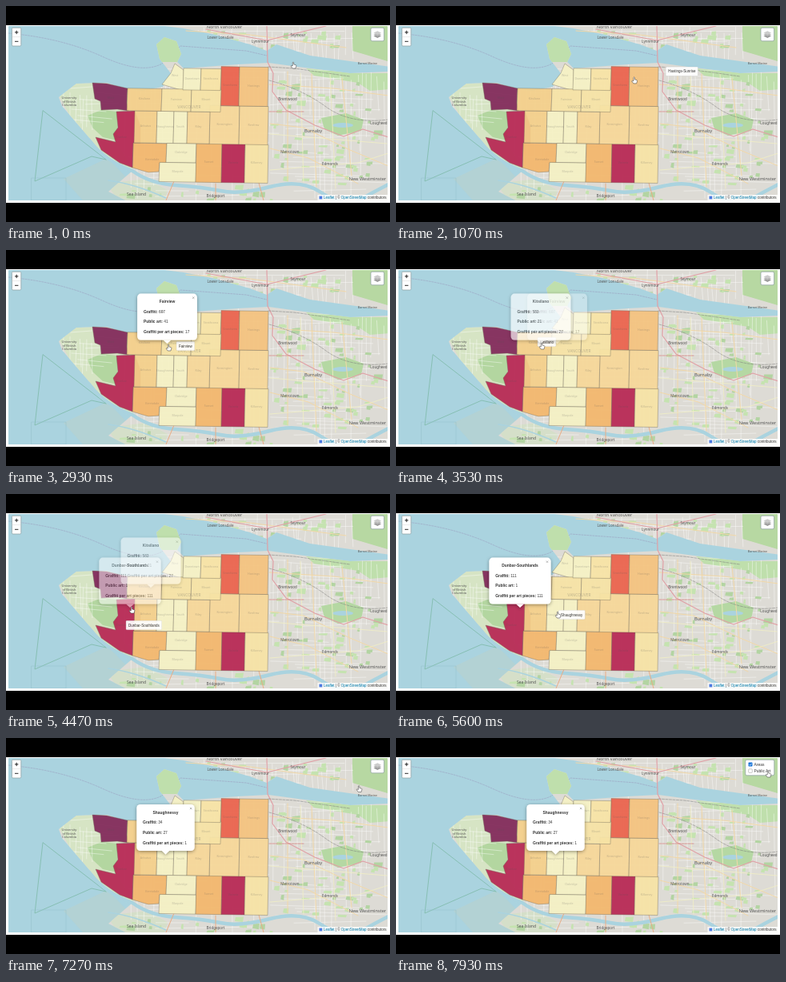
Recreate the animation shown at these times as an HTML page. Size 480 by 270 pixels, loop 8 s.

```html
<!DOCTYPE html>
<html lang="en">
<head>
<meta charset="utf-8">
<title>Neighbourhood map</title>
<style>
html, body { margin: 0; width: 100%; height: 100%; overflow: hidden; background: #000; }
svg { display: block; width: 100vw; height: 100vh; font-family: "Liberation Sans", Arial, sans-serif; }
.label { font-family: "Noto Sans", sans-serif; fill: #555; text-anchor: middle; }
.road { fill: none; stroke-linecap: round; stroke-linejoin: round; }
.area { fill-opacity: .93; stroke: #77705f; stroke-opacity: .75; stroke-width: .55; }
</style>
</head>
<body>
<svg id="stage" viewBox="0 0 480 270"></svg>
<script>
const LOOP = 8000, LAG = 200, FADE = 200;
const WATER = '#aad3df', GREEN = '#bfdfac';
const stage = document.getElementById('stage');

let seed = 11;
const rand = () => (seed = (seed * 16807) % 2147483647) / 2147483647;
const between = (a, b) => a + rand() * (b - a);

const poly = (pts, fill, extra = '') => `<polygon points="${pts}" fill="${fill}" ${extra}/>`;
const road = (d, color, width, extra = '') =>
  `<path class="road" d="${d}" stroke="${color}" stroke-width="${width}" ${extra}/>`;
const box = (x, y, w, h, r, extra = 'fill="#fff"') =>
  `<rect x="${x}" y="${y}" width="${w}" height="${h}" rx="${r}" ${extra}/>`;
const label = (x, y, text, size = 4.5, extra = '') =>
  `<text class="label" x="${x}" y="${y}" font-size="${size}" ${extra}>${text}</text>`;

const SOUTH = 'M70 125L66 114L88 97L126 96L152 104L170 106L196 101L206 84L192 66L188 48L198 39L213 44L219 60L214 70L222 78L290 73L328 71L365 76L430 84L480 82V243H150L128 232L158 206L122 186L107 168Z';
const NORTH = 'M190 24L222 28L262 36L305 48L326 56L338 48L380 62L480 76V24Z';

function streets(x0, x1, y0, y1) {
  let d = '';
  for (let x = x0; x < x1; x += between(4, 9)) d += `M${x} ${between(y0, y0 + 15)}l${between(-3, 3)} ${between(30, y1 - y0)}`;
  for (let y = y0; y < y1; y += between(4, 9)) d += `M${between(x0, x0 + 40)} ${y}l${between(40, x1 - x0)} ${between(-4, 6)}`;
  return road(d, '#fff', .5, 'opacity=".8"');
}

function parks(count, x0, x1, y0, y1) {
  let out = '';
  for (let i = 0; i < count; i++) {
    const x = between(x0, x1), y = between(y0, y1), w = between(2, 11), h = between(2, 7);
    out += poly(`${x},${y} ${x + w},${y + between(-1, 1)} ${x + w * .9},${y + h} ${x - 1},${y + h * .8}`,
      rand() < .6 ? '#c5e3b0' : '#b3d4a2');
  }
  return out;
}

function baseMap() {
  const river = 'M104 168Q124 194 158 206Q180 222 212 224T268 231T330 226T392 232T436 246Q458 233 480 222';
  const motorway = 'M326 25L327 70L334 84L333 107L350 130L386 149L422 163L446 154L478 164';
  return box(3, 25, 474, 218, 0, `fill="${WATER}"`) +
    poly('72,216 127,190 150,214 150,243 96,243', '#b3d2d4') +
    road('M46 131L36 219L107 188L125 192Z', '#83bdae', .9) +
    road('M32 215H75V243H32Z', '#93bcc9', .5) +
    road('M3 34Q70 40 120 63T195 72L218 50L300 56L326 62', '#9a9fc0', .6, 'stroke-dasharray="2 1.5"') +
    `<path d="${SOUTH}${NORTH}" fill="#dddbd5"/><g clip-path="url(#land)">` +
    poly('60,100 108,95 152,104 152,131 118,132 138,170 160,206 100,175', '#d6e4c4') +
    poly('102,137 119,130 140,132 139,168 121,164 108,152', '#b3d6a0') +
    box(186, 38, 34, 32, 6, `fill="${GREEN}"`) +
    poly('375,78 440,84 480,84 480,104 455,106 440,96 385,87', GREEN) +
    poly('433,24 480,24 480,70 433,56', '#b7d8a2') +
    poly('126,222 175,216 202,230 198,243 140,243', '#d5dfc9') +
    streets(330, 476, 80, 238) + streets(225, 435, 25, 62) + streets(150, 328, 78, 240) + streets(72, 115, 103, 145) +
    parks(75, 331, 472, 88, 225) + parks(22, 250, 430, 26, 55) + parks(20, 130, 330, 224, 241) +
    poly('394,140 425,134 447,142 444,156 415,162 398,154', '#b5d8a3') +
    `<ellipse cx="421" cy="149" rx="13" ry="3" fill="${WATER}"/></g>` +
    road(river, WATER, 4.5) + road('M128 218Q160 222 200 240', WATER, 1.6) +
    road('M329 98L410 103L478 112M330 147L372 152L430 180L478 200M330 178L378 190L440 222M352 82V218M382 85L388 226M420 90L432 212M225 31L305 36L425 52', '#f2d8a8', 1) +
    road('M330 160L476 172M368 84L372 220M405 84L412 228M330 205L440 196L478 184', '#f1efc4', .8) +
    road(motorway + 'M250 29L326 43L400 25', '#e0a0a6', 1.2) +
    road('M329 132H372', '#d77d7d', .7, 'stroke-dasharray="3 1"') +
    road('M329 93Q370 104 400 126T478 142M328 76L360 78L430 88', '#777', .5, 'stroke-dasharray="3 1.5"') +
    road('M262 222V243M210 219L200 243M316 221L322 243', '#e9ad85', 1);
}

function labels() {
  return [
    [273, 28, 'North Vancouver', 5.6], [268, 41, 'Lower Lonsdale'], [318, 46, 'Lynnmour'], [365, 38, 'Seymour'],
    [352, 118, 'Brentwood'], [384, 158, 'Burnaby', 5.6], [355, 184, 'Metrotown'], [405, 199, 'Edmonds'],
    [452, 218, 'New Westminster', 5.6], [466, 148, 'Lougheed'], [452, 73, 'Barnet Marine', 3.6],
    [262, 239, 'Bridgeport'], [163, 237, 'Sea Island', 5],
    [79, 116, 'University', 4], [79, 120.5, 'of British', 4], [79, 125, 'Columbia', 4]
  ].map(n => label(...n)).join('');
}

// Areas lie in rows of blocks: top, bottom, x edges, then one colour and name per block
const TONES = { p: '#f5f1c4', y: '#f7e3a5', m: '#f7d898', a: '#f5d08a', h: '#f5c37e', o: '#f4b76c', r: '#eb624c', c: '#b72753', d: '#82285a' };
const ROWS = [
  [124, 173, [255, 292, 328], 'mm', ['Kensington-Cedar Cottage', 'Renfrew-Collingwood']],
  [75, 124, [269, 292, 328], 'rh', ['Grandview-Woodland', 'Hastings-Sunrise']],
  [132, 172, [161, 189, 210, 227, 255], 'appm', ['Arbutus Ridge', 'Shaughnessy', 'South Cambie', 'Riley Park']],
  [104, 132, [152, 195, 232, 269], 'ayy', ['Kitsilano', 'Fairview', 'Mount Pleasant']],
  [78, 105, [222, 244, 269], 'py', ['Downtown', 'Strathcona']],
  [172, 196, [201, 238], 'p', ['Oakridge']],
  [196, 220, [192, 238], 'p', ['Marpole']],
  [172, 220, [238, 270, 299, 328], 'ocy', ['Sunset', 'Victoria-Fraserview', 'Killarney']]
];
const SHORES = [
  ['p', 'West End', '195,98 206,84 211,72 222,80 222,106'],
  ['d', 'West Point Grey', '108,96 126,97 152,103 151,121 153,131 139,129 119,130 118,119 111,116'],
  ['o', 'Kerrisdale', '159,171 201,172 200,196 192,196 191,207 178,208 158,202'],
  ['c', 'Dunbar-Southlands', '138,132 161,131 168,150 168,171 159,171 158,202 142,196 119,180 112,164 137,170 134,160 140,152']
];

function areas() {
  const shapes = SHORES.slice();
  for (const [top, bottom, edges, tones, names] of ROWS) {
    names.forEach((name, i) => {
      const [l, r] = [edges[i], edges[i + 1]];
      const tilt = x => (x - 230) * .016;
      shapes.push([tones[i], name, `${l},${top + tilt(l)} ${r},${top + tilt(r)} ${r - 1},${bottom + tilt(r)} ${l - 1},${bottom + tilt(l)}`]);
    });
  }
  const middle = pts => {
    const all = pts.split(' ').map(p => p.split(',').map(Number));
    return [0, 1].map(k => all.reduce((sum, p) => sum + p[k], 0) / all.length);
  };
  return shapes.map(([tone, name, pts]) => poly(pts, TONES[tone], `class="area" data-name="${name}"`)).join('') +
    shapes.map(([, name, pts]) => label(...middle(pts), name.split(/[- ]/)[0], 3.6, 'opacity=".3"')).join('') +
    label(229, 128, 'VANCOUVER', 5, 'opacity=".33"');
}

function controls() {
  const rim = 'fill="#fff" stroke="#8b9ca0" stroke-width=".7"';
  const sheets = ['#999', '#b5b5b5', '#ccc'].map((c, i) =>
    `<path d="M459.5 ${37.6 - 2 * i}l4.8-2.4l4.8 2.4l-4.8 2.4z" fill="${c}"/>`).join('');
  return box(7.4, 27.2, 11.4, 22.8, 1.4, rim) +
    '<path d="M7.4 38.6h11.4" stroke="#ccc" stroke-width=".4"/>' +
    '<path d="M11 32.9h4.4M13.2 30.7v4.4M11 44.3h4.4" stroke="#111" stroke-width=".9"/>' +
    `<g id="toggle">${box(456, 27.2, 16.6, 16.6, 1.8, rim)}${sheets}</g>` +
    '<g id="layers" font-size="4.9" fill="#333">' + box(436.8, 27.2, 36, 19.6, 1.8, rim) +
    box(440.5, 30.6, 5, 5, .8, 'fill="#1673d8"') +
    '<path d="M441.6 33.1l1.1 1.2l1.8-2.3" fill="none" stroke="#fff" stroke-width=".7"/>' +
    box(440.7, 38.8, 4.6, 4.6, .8, 'fill="#fff" stroke="#777" stroke-width=".4"') +
    '<text x="447.6" y="34.9">Areas</text><text x="447.6" y="42.9">Public Art</text></g>' +
    box(389.5, 236, 87.5, 7, 0, 'fill="#fff" fill-opacity=".8"') +
    box(391.5, 237.6, 3.8, 3.8, 0, 'fill="#4c7be1"') +
    '<text x="475.4" y="241" font-size="4.5" text-anchor="end" fill="#333"><tspan fill="#0078a8">Leaflet</tspan> | © <tspan fill="#0078a8">OpenStreetMap</tspan> contributors</text>';
}

// name, graffiti, art, anchor x and y, opening time; the next one closes it
const POPUPS = [
  ['Fairview', 697, 41, 201.5, 117, 2430],
  ['Kitsilano', 583, 21, 181, 117, 3400],
  ['Dunbar-Southlands', 111, 1, 155, 142, 4370],
  ['Shaughnessy', 34, 27, 199.5, 145.4, 5740]
];

function popup([name, graffiti, art, x, y]) {
  const ratio = Math.floor(graffiti / art);
  const w = 70 + 2.4 * String(ratio).length, mid = w / 2;
  const rows = [['Graffiti', graffiti], ['Public art', art], ['Graffiti per art pieces', ratio]].map(([key, value], i) =>
    `<text x="7.8" y="${24.1 + 12.7 * i}"><tspan font-weight="bold">${key}:</tspan> ${value}</text>`).join('');
  return `<g class="popup" transform="translate(${x - mid} ${y - 62.4})" font-size="4.9" fill="#333">` +
    `<g filter="url(#shadow)">${box(0, 0, w, 58, 4.6)}${poly(`${mid - 4.8},57.8 ${mid + 4.8},57.8 ${mid},62.4`, '#fff')}</g>` +
    `<text x="${mid}" y="11.6" text-anchor="middle" font-weight="bold">${name}</text>${rows}` +
    `<path d="M${w - 5.8} 3.9l2.4 2.4m0-2.4l-2.4 2.4" stroke="#757575" stroke-width=".5"/></g>`;
}

stage.innerHTML = `<defs>
  <clipPath id="land"><path d="${SOUTH}${NORTH}"/></clipPath>
  <clipPath id="view">${box(3, 25, 474, 218, 0)}</clipPath>
  <filter id="shadow" x="-20%" y="-20%" width="140%" height="150%"><feDropShadow dx="0" dy="1.1" stdDeviation="2" flood-opacity=".4"/></filter>
</defs>
<rect width="480" height="270"/>${box(0, 24, 480, 222, 0)}
<g clip-path="url(#view)">${baseMap()}${labels()}${areas()}
<g id="tip"><rect id="tipBox" y="-5.7" height="11.4" rx="1.1" fill="#fff" stroke="#aaa" stroke-opacity=".6" stroke-width=".4"/>
<text id="tipText" x="3" y="1.6" font-size="4.5" fill="#222"></text></g>
${controls()}${POPUPS.map(popup).join('')}</g>
<path id="cursor" d="M-.7.5Q0-.5.7.5V3L3.4 3.7Q4 4 3.8 5L3 8H-.8L-3 5Q-2.6 4-.7 5Z" fill="#fff" stroke="#333" stroke-width=".5"/>`;

// time, x, y
const PATH = [
  [0, 359, 70], [450, 359, 70], [1900, 203, 118], [2950, 203, 118], [3330, 167, 113], [3480, 182, 116], [3850, 182, 116],
  [4270, 140, 162], [4400, 157, 141], [4900, 157, 141], [5400, 193, 149], [5600, 202, 147], [6380, 202, 147],
  [6600, 252, 146], [7000, 375, 102], [7480, 465, 41], [LOOP, 465, 41]
];

// Smooth path through the keys, at rest wherever two neighbours coincide
function along(keys, t) {
  let i = 0;
  while (i < keys.length - 2 && t >= keys[i + 1][0]) i++;
  const same = (a, b) => a[1] === b[1] && a[2] === b[2];
  const slope = (k, axis) => {
    const a = keys[k - 1], b = keys[k], c = keys[k + 1];
    return !a || !c || same(a, b) || same(b, c) ? 0 : (c[axis] - a[axis]) / (c[0] - a[0]);
  };
  const a = keys[i], b = keys[i + 1], d = b[0] - a[0], u = (t - a[0]) / d;
  const blend = u * u * (3 - 2 * u);
  return [1, 2].map(n => a[n] + (b[n] - a[n]) * blend +
    d * u * (1 - u) * (slope(i, n) * (1 - u) - slope(i + 1, n) * u));
}

const [tip, tipBox, tipText, cursor, toggle, layers] =
  ['tip', 'tipBox', 'tipText', 'cursor', 'toggle', 'layers'].map(id => document.getElementById(id));
const popups = [...document.querySelectorAll('.popup')];
const shapes = [...document.querySelectorAll('.area')].reverse();
const spot = stage.createSVGPoint();
const clamp = v => Math.max(0, Math.min(1, v));
const place = (el, x, y) => el.setAttribute('transform', `translate(${x} ${y})`);
const show = (el, on) => el.setAttribute('visibility', on ? 'visible' : 'hidden');

function areaAt(x, y) {
  [spot.x, spot.y] = [x, y];
  const hit = shapes.find(s => s.isPointInFill(spot));
  return hit ? hit.dataset.name : '';
}

function draw(t) {
  const [x, y] = along(PATH, t);
  place(cursor, x, y);

  // The tooltip trails the pointer
  const [tx, ty] = along(PATH, Math.max(0, t - LAG));
  const name = areaAt(x, y);
  place(tip, tx + 10, ty + 2);
  if (tipText.textContent !== name) {
    tipText.textContent = name;
    tipBox.setAttribute('width', tipText.getComputedTextLength() + 6);
  }
  tip.setAttribute('opacity', name ? .92 : 0);

  popups.forEach((el, i) => {
    const open = POPUPS[i][5], close = POPUPS[i + 1] ? POPUPS[i + 1][5] : LOOP + FADE;
    el.setAttribute('opacity', clamp((t - open) / FADE) * clamp(1 - (t - close) / FADE));
  });
  const expanded = t >= 7440;
  show(toggle, !expanded);
  show(layers, expanded);
}

const start = performance.now();
function tick() {
  draw((performance.now() - start) % LOOP);
  requestAnimationFrame(tick);
}
tick();
</script>
</body>
</html>
```
